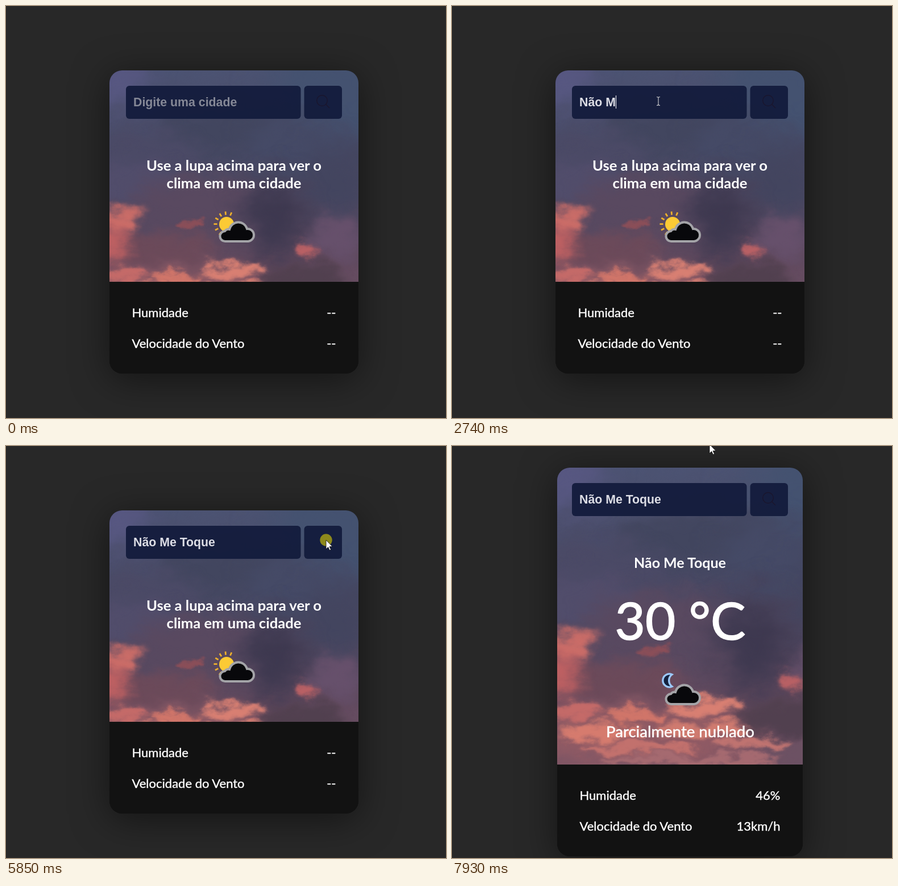
Write an HTML page that moves like this. It is 774 by 723 pixels and loops after 8000 ms.

```html
<!DOCTYPE html>
<html lang="pt">
<head>
<meta charset="utf-8">
<title>Clima</title>
<style>
  html, body { margin: 0; width: 100%; height: 100%; overflow: hidden; background: #282828; }
  svg { display: block; width: 774px; height: 723px; }
  text { font: 22px Lato, sans-serif; fill: #fff; stroke: #fff; stroke-width: .018em; white-space: pre; }
  .title { font-weight: 700; font-size: 25.6px; stroke: none; }
  .town { font-size: 25px; }
  .temp { font-size: 92px; }
  .sky-text { font-size: 27.6px; }
  .mid { text-anchor: middle; }
  .end { text-anchor: end; }
  .shadow { fill: #121212; filter: drop-shadow(0 10px 32px rgba(0, 0, 0, .5)); }
  .field { fill: rgba(19, 28, 61, .95); }
  .field-text { font: bold 21.3px "Liberation Sans", Arial, sans-serif; stroke: none; }
</style>
</head>
<body>
<svg viewBox="0 0 774 723">
  <defs>
    <linearGradient id="dusk" x2="0" y2="1">
      <stop stop-color="#4c5677"/>
      <stop offset=".4" stop-color="#4a4964"/>
      <stop offset=".7" stop-color="#614a5f"/>
      <stop offset="1" stop-color="#7d5768"/>
    </linearGradient>
    <filter id="cloudy" filterUnits="userSpaceOnUse" x="-40" y="-40" width="520" height="520"
            color-interpolation-filters="sRGB">
      <feTurbulence type="fractalNoise" baseFrequency=".022 .035" numOctaves="5" seed="4"/>
      <feDisplacementMap in="SourceGraphic" scale="42" xChannelSelector="R" yChannelSelector="G"/>
    </filter>
    <g id="sky" filter="url(#cloudy)"></g>
    <path id="cloud" fill="#08080b" stroke="#a4a4a8" stroke-width="4"
          d="M386 413a9 9 0 0 1-1-18q3-4 8-3a16 16 0 0 1 31-1a11 11 0 0 1 2 22z"/>
  </defs>
  <path d="M.5 0V723" stroke="#202020"/>
  <g id="before"></g>
  <g id="after"></g>
  <g id="bar">
    <rect class="field" x="211" y="140" width="307.5" height="58" rx="6"/>
    <rect class="field" x="524.5" y="140" width="66.5" height="58" rx="6"/>
    <path id="lens" d="M565.3 166a9.3 9.3 0 1 0-18.6 0a9.3 9.3 0 1 0 18.6 0M563 173l6 6"
          fill="none" stroke="#1b152b" stroke-width="1.2"/>
    <text id="query" class="field-text" x="224" y="176"></text>
    <rect id="caret" y="157" width="1.2" height="23" fill="#e4e4ea"/>
  </g>
  <g id="cursor">
    <circle id="press" r="10.7" fill="rgba(240, 225, 0, .55)"/>
    <path id="arrow" d="M0 0V16l3.7-3.5 2.5 5.5 2.4-1-2.5-5.4h5z" fill="#fff" stroke="#111" stroke-width=".8"/>
    <path id="beam" d="M-3-7.5q3 0 3 2v11q0 2-3 2M3-7.5q-3 0-3 2M0 5.5q0 2 3 2"
          fill="none" stroke="#c4c4c8" stroke-width="1.2"/>
  </g>
</svg>
<script>
const $ = id => document.getElementById(id);
const show = (id, on) => $(id).setAttribute('display', on ? 'inline' : 'none');
const label = (x, y, cls, str) => `<text x="${x}" y="${y}" class="${cls}">${str}</text>`;

// Clouds: centre x, centre y, radius x, radius y, colour
const clouds = [
  [5, 10, 60, 60, '#575781'], [400, 40, 120, 90, '#445270'],
  [215, 105, 130, 42, '#42465f'], [70, 150, 90, 40, '#4b4a66'],
  [330, 130, 90, 50, '#454a66'], [40, 195, 80, 36, '#514d6b'],
  [400, 200, 60, 70, '#43455f'], [150, 230, 110, 45, '#594960'],
  [290, 262, 52, 72, '#3d384f'], [90, 315, 100, 30, '#6b4a5a'],
  [400, 295, 45, 35, '#66506b'], [120, 395, 190, 48, '#8f5a64'],
  [340, 368, 75, 30, '#51404f'], [380, 425, 80, 24, '#6c5163'],
  [20, 262, 32, 22, '#cb6d68'], [8, 305, 28, 34, '#bd6062'],
  [150, 272, 24, 8, '#8a4e58'], [348, 313, 17, 15, '#b86064'],
  [215, 350, 58, 12, '#d87f72'], [25, 360, 36, 12, '#c46a68'],
  [115, 366, 50, 9, '#d07569'], [65, 390, 62, 11, '#d67b6e'],
  [215, 384, 70, 11, '#cf7a6f'], [285, 408, 55, 9, '#bf7370'],
  [120, 414, 90, 9, '#c2716d'], [200, 432, 130, 8, '#a56a70']
];
$('sky').innerHTML = '<rect x="-60" y="-60" width="560" height="560" fill="url(#dusk)"/>' +
  clouds.map(([x, y, rx, ry, fill]) =>
    `<ellipse cx="${x}" cy="${y}" rx="${rx}" ry="${ry}" fill="${fill}" style="filter:blur(${ry / 3}px)"/>`).join('');

function card(id, x, y, width, height, photo, zoom, humidity, wind, content) {
  const frame = `x="${x}" y="${y}" width="${width}" height="${height}" rx="22"`;
  const left = x + 39.5, right = x + width - 39.5, foot = y + height;
  $(id).innerHTML = `
    <clipPath id="${id}-clip"><rect ${frame}/></clipPath>
    <rect class="shadow" ${frame}/>
    <g clip-path="url(#${id}-clip)">
      <use href="#sky" transform="translate(${x} ${y}) scale(${zoom})"/>
      <rect x="${x}" y="${y + photo}" width="${width}" height="${height - photo}" fill="#121212"/>
    </g>` +
    label(left, foot - 99.5, '', 'Humidade') + label(right, foot - 99.5, 'end', humidity) +
    label(left, foot - 45, '', 'Velocidade do Vento') + label(right, foot - 45, 'end', wind) + content;
}

const rays = Array.from({ length: 7 }, (_, i) =>
  `<path d="M404.5 383h6" stroke="#eeb02c" stroke-width="2.8" transform="rotate(${125 + 28 * i} 388 383)"/>`).join('');

card('before', 182, 113, 438, 532, 371, 1, '--', '--',
  label(401, 289, 'title mid', 'Use a lupa acima para ver o') +
  label(401, 320, 'title mid', 'clima em uma cidade') +
  rays + '<circle cx="388" cy="383" r="13" fill="#fcca35"/><use href="#cloud"/>');

card('after', 185, 38, 432, 682, 521, 1.192, '46%', '13km/h',
  label(401, 214, 'title town mid', 'Não Me Toque') +
  label(401.5, 340, 'temp mid', '30 °C') +
  label(401.5, 511, 'sky-text mid', 'Parcialmente nublado') +
  '<path d="M387 401A11.5 11.5 0 1 0 387 422A13 13 0 0 1 387 401z" fill="#14223f" stroke="#9cc9fb" stroke-width="3.4"/>' +
  '<use href="#cloud" y="40"/>');

// "<" is a backspace
const keys = [...'Não Me t<Toque'];
const keyTimes = [1810, 2210, 2340, 2470, 2740, 2810, 2940, 3160, 3620, 3890, 4020, 4150, 4280, 4410];
const FOCUS = 680, SEARCH = 5850, RESULT = 5920, LOOP = 8000;

// Pointer path: time, x, y
const path = [
  [70, 714, 705], [280, 600, 430], [480, 430, 215], [620, 352, 158], [820, 351, 158],
  [880, 361, 170], [1080, 361, 170], [1210, 363, 167], [4800, 363, 167], [4870, 379, 166],
  [5010, 706, 331], [5260, 706, 331], [5500, 620, 220], [5780, 563, 165],
  [7110, 563, 165], [7670, 477, -3], [7860, 477, -3], [7930, 453, -3], [LOOP, 453, -3]
];
function pointer(t) {
  const i = Math.max(1, path.findIndex(p => p[0] > t));
  const [t0, x0, y0] = path[i - 1], [t1, x1, y1] = path[i];
  const k = Math.max(0, (t - t0) / (t1 - t0));
  return [x0 + (x1 - x0) * k, y0 + (y1 - y0) * k];
}

function draw(t) {
  const done = t >= RESULT;
  show('before', !done);
  show('after', done);
  $('bar').setAttribute('transform', `translate(0 ${done ? -75 : 0})`);

  let typed = '', lastInput = FOCUS;
  keys.forEach((key, i) => {
    if (t < keyTimes[i]) return;
    typed = key === '<' ? typed.slice(0, -1) : typed + key;
    lastInput = keyTimes[i];
  });
  const query = $('query');
  query.textContent = typed || 'Digite uma cidade';
  query.style.fill = typed ? '#dcdde5' : '#858896';
  $('caret').setAttribute('x', 224 + (typed ? query.getComputedTextLength() : .5));
  show('caret', t >= FOCUS && t < SEARCH && Math.floor((t - lastInput) / 530) % 2 === 0);

  const [x, y] = pointer(t);
  const inRow = !done && y > 140 && y < 198;
  const overField = inRow && x > 211 && x < 518;
  const overButton = inRow && x > 525 && x < 591;
  $('cursor').setAttribute('transform', `translate(${x} ${y})`);
  show('cursor', t >= 70);
  show('beam', overField);
  show('arrow', !overField);
  show('lens', !overButton);
  show('press', (t >= FOCUS && t < 750) || (t >= SEARCH && t < RESULT));
}

function tick() {
  draw(performance.now() % LOOP);
  requestAnimationFrame(tick);
}
tick();
</script>
</body>
</html>
```
